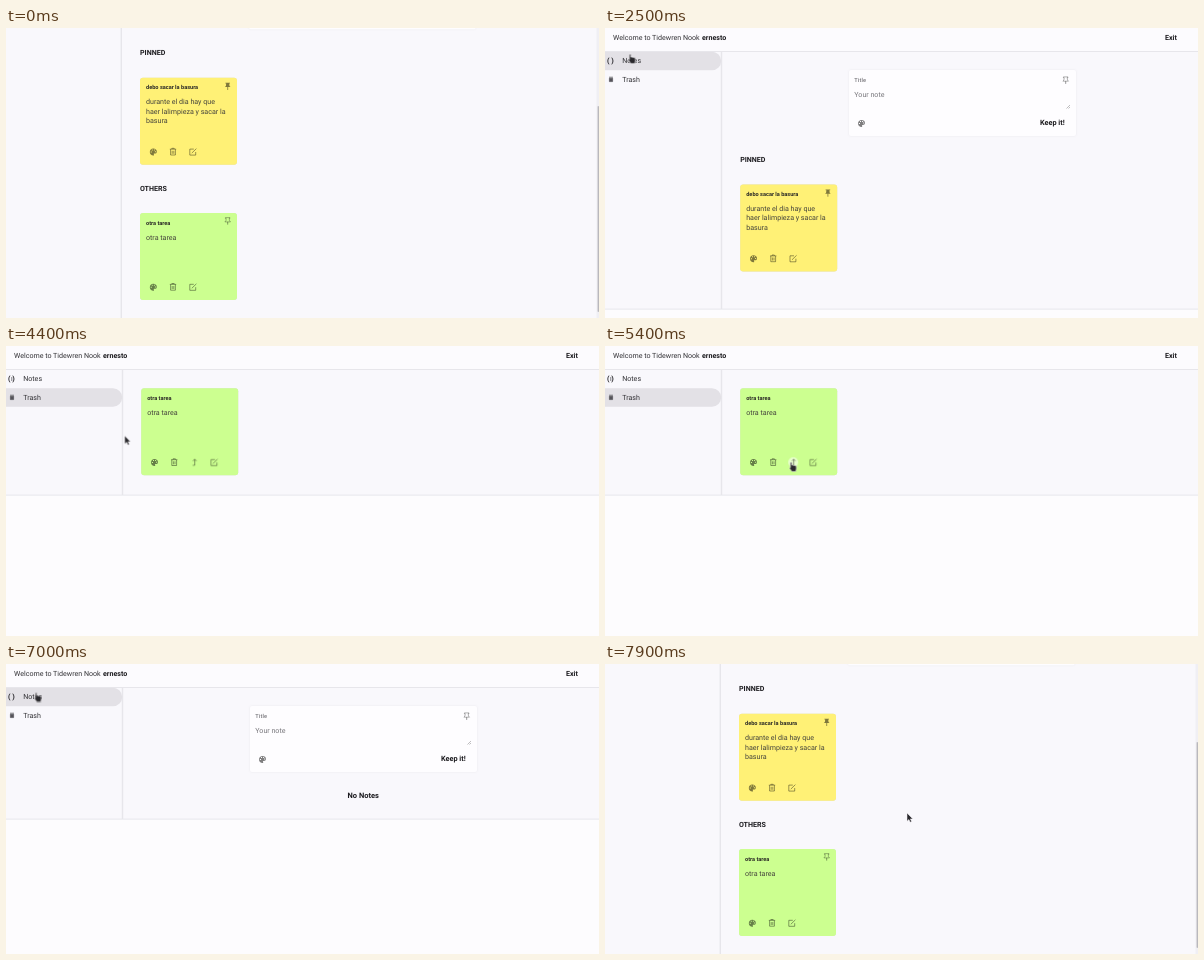
Animation of 593x290 px, one loop 8 s. Source, as an HTML page:

```html
<!DOCTYPE html>
<html lang="en">
<head>
<meta charset="utf-8">
<title>Notes board</title>
<style>
  html, body { margin: 0; width: 100%; height: 100%; overflow: hidden; background: #fdfcfe; }
  svg { display: block; width: 593px; height: 290px; }

  text { font: 7.1px Roboto, sans-serif; fill: #333236; text-rendering: geometricPrecision; white-space: pre; }
  .b { font-weight: 700; fill: #1c1b1f; }
  .small { font-size: 5.6px; font-weight: 700; fill: #2b2a26; }
  .hint { fill: #77767b; }
  .body { fill: #45443c; }
  .panel { fill: #f9f8fc; }
  .line { fill: #e7e6eb; }
  .pill { fill: #e3e1e6; }
  .ink { fill: none; stroke: #000; stroke-opacity: .5; stroke-width: .8; }
  .solid { fill: #000; fill-opacity: .5; }
  .card { filter: drop-shadow(0 .4px .6px rgba(0, 0, 0, .14)); }
  .form { fill: #fefdff; filter: drop-shadow(0 0 1px rgba(0, 0, 0, .06)); }

  /* One 8 s clock; hard cuts use step-end */
  .cut { opacity: 0; animation: 8s step-end infinite; }
  #board { animation-name: board; }
  #pinned { animation-name: pinned; }
  #trash { animation-name: trash; }
  #trashed { animation-name: trashed; }
  #empty { animation-name: empty; }
  #hoverBin { animation-name: hoverBin; }
  #hoverBack { animation-name: hoverBack; }
  #pointer { animation-name: pointer; }
  #arrow { animation-name: arrow; }
  #hand { animation-name: hand; }
  #page { animation: page 8s linear infinite; }
  #thumb { animation: thumb 8s linear infinite; }
  #path { animation: path 8s linear infinite; }

  @keyframes board { 0%, 90% { opacity: 1 } 16.25%, 89.9% { opacity: 0 } 100% { opacity: 1 } }
  @keyframes pinned { 0%, 40%, 100% { opacity: 0 } 16.25% { opacity: 1 } }
  @keyframes trash { 0%, 87.5%, 100% { opacity: 0 } 40% { opacity: 1 } }
  @keyframes trashed { 0% { opacity: 1 } 70%, 100% { opacity: 0 } }
  @keyframes empty { 0%, 90%, 100% { opacity: 0 } 87.5% { opacity: 1 } }
  @keyframes hoverBin { 0%, 16.25%, 100% { opacity: 0 } 12.5% { opacity: 1 } }
  @keyframes hoverBack { 0%, 70%, 100% { opacity: 0 } 65% { opacity: 1 } }
  @keyframes pointer { 0% { opacity: 0 } 1.25%, 100% { opacity: 1 } }
  @keyframes hand {
    0%, 20%, 45.5%, 74%, 90.2%, 100% { opacity: 0 }
    10.8%, 30.5%, 64%, 84% { opacity: 1 }
  }
  @keyframes arrow {
    0%, 20%, 45.5%, 74%, 90.2%, 100% { opacity: 1 }
    10.8%, 30.5%, 64%, 84% { opacity: 0 }
  }
  @keyframes page {
    0%, 89.9% { transform: translate(-1.2px, -106.7px) }
    90%, 95% { transform: translate(-1.2px, 0) }
    98.75%, 100% { transform: translate(-1.2px, -106.7px) }
  }
  @keyframes thumb {
    0%, 89.9% { transform: translateY(78px) }
    90%, 95% { transform: translateY(0) }
    98.75%, 100% { transform: translateY(78px) }
  }
  @keyframes path {
    0%, 1.25% { transform: translate(312px, 150px); animation-timing-function: ease-in-out }
    11.25%, 18.75% { transform: translate(168px, 257px) }
    31.25% { transform: translate(23.5px, 26px); animation-timing-function: ease-in-out }
    38.75%, 42.5% { transform: translate(21.5px, 51px); animation-timing-function: ease-in-out }
    65%, 73.75% { transform: translate(184.5px, 116px) }
    76.25% { transform: translate(232px, 95px) }
    85%, 89.5% { transform: translate(28.5px, 28.5px); animation-timing-function: ease-in-out }
    95%, 100% { transform: translate(302px, 149px) }
  }
</style>
</head>
<body>
<svg viewBox="0 0 593 290">
  <defs>
    <!-- Icons are centred on 0,0 -->
    <g id="palette">
      <path class="solid" fill-rule="evenodd" d="M0-3.5C2-3.5 3.5-2.2 3.5-.4 3.5 1 2.4 1.5 1.2 1.4.4 1.4.3 2 .6 2.5 1 3.2.6 3.6 0 3.5-2 3.4-3.5 2-3.5 0S-2-3.5 0-3.5ZM-2.6-.6h1.1v1h-1.1ZM-1.5-2.5h1v1h-1ZM.6-2.5h1v1h-1ZM1.6-.9h1v1h-1Z"/>
    </g>
    <g id="bin">
      <path class="ink" d="M-3.2-2.6H3.2M-1.2-2.8V-3.5H1.2V-2.8M-2.4-2.4V3.2H2.4V-2.4M-.8-1V2M.8-1V2"/>
    </g>
    <g id="edit">
      <path class="ink" d="M.8-2.7H-3.2V3.3H2.7V.2"/>
      <path class="ink" stroke-width="1.3" d="M-1.2 1.3 3.4-3.2"/>
    </g>
    <g id="back">
      <path class="ink" d="M-2 3H0V-2.8M-1.8-1.2 0-3.2 1.8-1.2"/>
    </g>
    <path id="pinShape" d="M-2.3-3.4H2.3V-2.6H1.5L1.8-.2 2.8.9H-2.8L-1.8-.2-1.5-2.6H-2.3Z"/>
    <g id="pinOn"><use href="#pinShape" class="solid"/><path class="ink" d="M0 .8V3.8"/></g>
    <g id="pinOff"><use href="#pinShape" class="ink" style="stroke-width:.6"/><path class="ink" d="M0 .9V3.6"/></g>

    <g id="tools">
      <use href="#palette" x="13.3" y="74.3"/>
      <use href="#bin" x="33" y="74"/>
    </g>
    <g id="yellowCard">
      <rect class="card" width="97" height="87" rx="3" fill="#fff176"/>
      <text class="small" x="6" y="11.2">debo sacar la basura</text>
      <text class="body" x="6" y="26.7">durante el dia hay que</text>
      <text class="body" x="6" y="35.9">haer lalimpieza y sacar la</text>
      <text class="body" x="6" y="45.1">basura</text>
      <use href="#pinOn" x="87.7" y="8.4"/>
      <use href="#tools"/>
      <use href="#edit" x="53" y="74"/>
    </g>
    <g id="greenCard">
      <rect class="card" width="97" height="87" rx="3" fill="#ccff90"/>
      <text class="small" x="6" y="11.6">otra tarea</text>
      <text class="body" x="6" y="26.9">otra tarea</text>
    </g>

    <g id="header">
      <rect width="593" height="23.5" fill="#fcfbfe"/>
      <rect class="line" y="23" width="593" height="1"/>
      <text x="8" y="11.8">Welcome to Tidewren Nook</text>
      <text class="b" x="97" y="11.8">ernesto</text>
      <text class="b" x="560" y="11.8">Exit</text>
    </g>
    <g id="menu">
      <use href="#header"/>
      <text class="b" x="2" y="35.3" textLength="">( )</text>
      <text x="17.2" y="35.1">Notes</text>
      <path d="M4 49.2H8M4.4 50.2H7.6V53.6H4.4Z" fill="#55545a" stroke="#55545a" stroke-width=".7"/>
      <text x="17.2" y="53.8">Trash</text>
    </g>
    <path id="tab" class="pill" d="M0 0H107A9.2 9.2 0 0 1 107 18.4H0Z"/>
    <g id="notesMenu"><use href="#tab" y="23.8"/><use href="#menu"/></g>

    <g id="form">
      <rect class="form" x="244" y="42" width="227" height="66" rx="2"/>
      <text class="small hint" x="249.3" y="53.8" style="fill:#77767b;font-weight:500;letter-spacing:.15px">Title</text>
      <text class="hint" x="249.3" y="69.3">Your note</text>
      <path class="ink" style="stroke-width:.5" d="M461.5 80.5 465 77M463.5 80.5 465 79"/>
      <use href="#pinOff" x="460.7" y="52.3"/>
      <use href="#palette" x="256.5" y="95.5"/>
      <text class="b" x="435" y="96.8" style="font-size:7.3px">Keep it!</text>
    </g>
    <g id="pinnedList">
      <use href="#notesMenu"/>
      <use href="#form"/>
      <text class="b" x="135.2" y="134">PINNED</text>
      <use href="#yellowCard" x="135.2" y="156.5"/>
    </g>
  </defs>

  <rect width="593" height="290" fill="#fdfcfe"/>

  <g id="board" class="cut">
    <g id="page">
      <rect class="panel" y="23" width="596" height="374"/>
      <rect class="line" x="115.8" y="24" width="1.4" height="373"/>
      <use href="#pinnedList"/>
      <text class="b" x="135.2" y="269.3">OTHERS</text>
      <g transform="translate(135.2 291.7)">
        <use href="#greenCard"/>
        <use href="#pinOff" x="87.7" y="8"/>
        <circle id="hoverBin" class="cut" cx="33" cy="74" r="5" fill="#fff" fill-opacity=".55"/>
        <use href="#tools"/>
        <use href="#edit" x="53" y="74"/>
      </g>
    </g>
    <rect x="590.5" width="2.5" height="290" fill="#f0eff4"/>
    <rect id="thumb" x="591.6" width="1.4" height="206" rx=".7" fill="#b9b8bd"/>
  </g>

  <g id="pinned" class="cut">
    <rect class="panel" y="23" width="593" height="258"/>
    <rect class="line" x="115.8" y="24" width="1.4" height="257"/>
    <rect class="line" y="280.6" width="593" height="1"/>
    <use href="#pinnedList"/>
  </g>

  <g id="trash" class="cut">
    <rect class="panel" y="23" width="593" height="126"/>
    <rect class="line" x="115.8" y="24" width="1.4" height="125"/>
    <rect class="line" y="148.6" width="593" height="1"/>
    <use href="#tab" y="42.3"/>
    <use href="#menu"/>
    <rect x="5.2" y="31" width="1.1" height="4" fill="#8d8c92"/>
    <g id="trashed" class="cut">
      <g transform="translate(135.2 42.3)">
        <use href="#greenCard"/>
        <circle id="hoverBack" class="cut" cx="53" cy="74" r="5" fill="#fff" fill-opacity=".55"/>
        <use href="#tools"/>
        <use href="#back" x="53.5" y="74"/>
        <use href="#edit" x="73" y="74"/>
      </g>
    </g>
  </g>

  <g id="empty" class="cut">
    <rect class="panel" y="23" width="593" height="132"/>
    <rect class="line" x="115.8" y="24" width="1.4" height="131"/>
    <rect class="line" y="154.6" width="593" height="1"/>
    <use href="#notesMenu"/>
    <use href="#form"/>
    <text class="b" x="357.2" y="134" text-anchor="middle" style="font-size:7.5px">No Notes</text>
  </g>

  <g id="pointer" class="cut">
    <g id="path" fill="#29282c" stroke="#f4f3f7" stroke-width=".5" stroke-linejoin="round">
      <path id="arrow" class="cut" d="M0 0V8.2L1.9 6.5 3.2 9.2 4.6 8.5 3.4 5.9H5.8Z"/>
      <path id="hand" class="cut" d="M.9.5Q1.6-.2 2.4.6V3L6 3.6Q6.9 3.8 6.9 4.8V7L6.2 9.4H2.4L.1 6.3Q0 5.3.9 5.6Z"/>
    </g>
  </g>
</svg>
</body>
</html>
```
